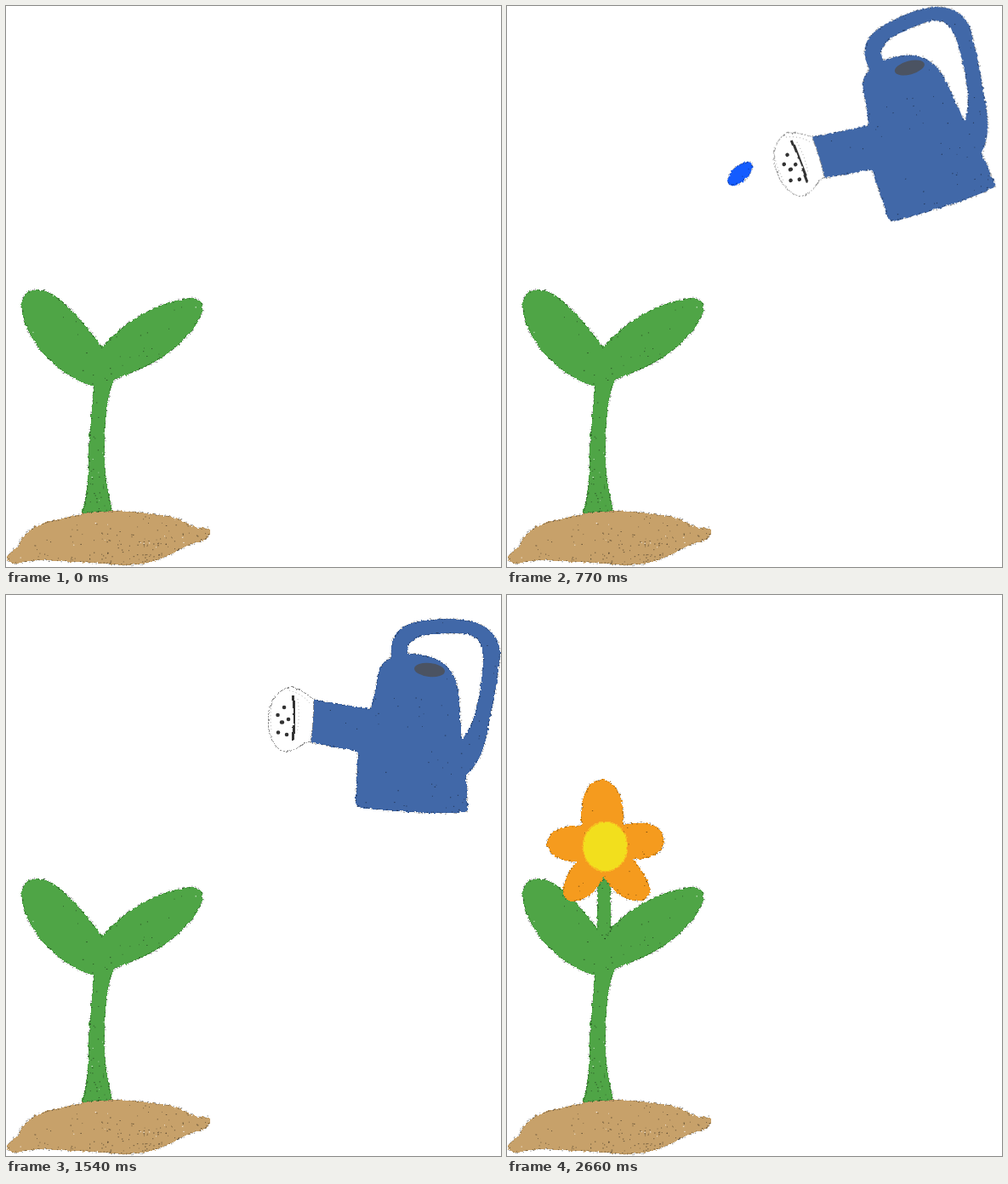
Animation, 582 px wide and 659 px high, one loop 3430 ms. Source, as an HTML page:

```html
<!DOCTYPE html>
<html lang="en">
<head>
<meta charset="utf-8">
<title>Growing a flower</title>
<style>
  html, body { margin: 0; width: 100%; height: 100%; overflow: hidden; background: #fff; }
  svg { display: block; width: 582px; height: 659px; }
  .crayon { filter: url(#rough); shape-rendering: crispEdges; }
  .green { fill: #4fa546; }
  .yellow { fill: #f2df1d; }
  .drop { fill: #145cff; }
</style>
</head>
<body>
<svg viewBox="0 0 582 659">
  <filter id="rough" color-interpolation-filters="sRGB">
    <feTurbulence type="fractalNoise" baseFrequency=".25" numOctaves="2" seed="4"/>
    <feDisplacementMap in="SourceGraphic" scale="3" xChannelSelector="R" yChannelSelector="G"/>
  </filter>

  <g id="plant">
    <path class="crayon green" data-dark="60" data-light="8" d="M88 600Q97 570 97 540T98 505T103 447
      C78 440 56 424 39 403C25 383 18 366 18 350C19 338 28 333 37 333C50 333 61 342 74 354Q97 378 113 401
      C135 373 178 347 216 343C230 343 234 351 230 362C221 384 201 401 180 415Q158 428 127 439
      Q119 457 117 490T116 530Q116 560 127 600Z"/>
    <path class="crayon" fill="#c7a16a" data-dark="130" data-light="14" d="M1 647Q6 640 13 636C20 620 30 612 45 607
      Q70 601 95 595C125 592 150 593 180 598Q200 599 212 607T238 613Q244 619 234 627
      Q212 633 196 643C180 652 160 657 138 657Q120 655 100 654T45 651Q30 651 12 655Q2 654 1 647Z"/>
  </g>

  <path class="crayon green" data-from="1820" data-dark="6" d="M106 394V323H122V394L114 405"/>

  <ellipse class="crayon yellow" data-from="2100" data-to="2660" data-dark="5" cx="116.5" cy="295.5" rx="24.5" ry="29"/>

  <g data-from="2660">
    <path class="crayon" fill="#f59b1e" data-dark="24" d="M88 271C85 243 92 217 111 217C131 217 138 243 137 270
      C160 265 184 267 184 289C184 305 167 311 148 310Q162 326 168 344C169 357 159 361 149 359
      C134 357 121 344 114 331C105 350 90 360 76 360C65 359 64 347 68 337Q73 322 82 313
      C61 314 46 303 47 291C50 275 68 270 88 271Z"/>
    <ellipse class="crayon" fill="#f6bd20" cx="115.5" cy="295.5" rx="27" ry="30"/>
    <ellipse class="crayon yellow" cx="115.5" cy="295.5" rx="25.5" ry="28.5"/>
  </g>

  <g id="can" data-from="350" data-to="1820">
    <path class="crayon" fill="#4168a8" fill-rule="evenodd" data-dark="55" d="M358 122L428 134Q435 115 437 95Q440 79 453 73
      C452 49 458 42 474 34Q492 28 520 28C559 28 582 43 581 72Q576 115 568 150Q562 193 541 212
      L543 254Q530 257 500 256T425 251Q411 250 411 243L414 184L357 173Z
      M472 69C471 55 480 50 494 47Q518 43 543 46C562 52 562 68 560 92Q555 146 536 171
      Q534 148 533 125C532 96 521 69 472 69Z"/>
    <ellipse fill="#4b5362" cx="498" cy="88" rx="18" ry="8" transform="rotate(6 498 88)"/>
    <path class="crayon" fill="#fff" stroke="#888" stroke-width=".9" stroke-dasharray="3 1"
      d="M336 107Q352 114 362 123Q362 150 358 172Q349 174 345 178Q336 184 328 184Q317 181 311 166Q306 151 310 134Q316 112 336 107Z"/>
    <path class="crayon" fill="none" stroke="#333" stroke-width="3" d="M337 117Q342 142 337 170"/>
    <path fill="none" stroke="#aaa" stroke-dasharray="1 3" d="M333 112Q350 117 357 127M343 122Q346 143 342 162M316 118Q309 132 312 158"/>
    <path stroke="#333" stroke-width="4.5" stroke-linecap="round" d="M327 132h.1M319.5 141h.1M324 149.5h1M332 146h.1M320 161.5h.1M330 164h.1"/>
  </g>

  <ellipse class="crayon drop" data-from="770" data-to="1540" data-dark="3" rx="18" ry="9" transform="translate(274 197) rotate(-43)"/>
  <ellipse class="crayon drop" data-from="980" data-to="1540" data-dark="3" rx="18" ry="8.5" transform="translate(233 243) rotate(-62)"/>
  <ellipse class="crayon drop" data-from="1190" data-to="1540" data-dark="3" rx="17" ry="8.5" transform="translate(199 305) rotate(-78)"/>
</svg>

<script>
const LOOP = 3430;
const TILT = "translate(449.5 253) rotate(-21) translate(-411 -248)";
const svg = document.querySelector("svg");
const can = document.getElementById("can");

let seed = 7;
const random = () => (seed = (seed * 16807) % 2147483647) / 2147483647;
const spread = r => (random() * 2 - 1) * r;
const grain = (x, y) => `M${x.toFixed(1)} ${y.toFixed(1)}h${(0.6 + random()).toFixed(1)}`;

function addGrains(shape, d, color) {
  const path = document.createElementNS(svg.namespaceURI, "path");
  path.setAttribute("d", d);
  path.setAttribute("stroke", color);
  for (const name of ["transform", "data-from", "data-to"])
    if (shape.hasAttribute(name)) path.setAttribute(name, shape.getAttribute(name));
  shape.after(path);
}

function edgeGrains(shape) {
  let d = "";
  for (let s = 0; s < shape.getTotalLength(); s += 1.6) {
    const p = shape.getPointAtLength(s);
    if (random() < 0.6) d += grain(p.x - 0.5 + spread(1.2), p.y + spread(1.2));
  }
  return d;
}

// Grains gather towards the lower right, where the crayon is thinner.
function innerGrains(shape, count) {
  const box = shape.getBBox();
  let d = "";
  while (count > 0) {
    const p = svg.createSVGPoint();
    p.x = box.x + Math.sqrt(random()) * box.width;
    p.y = box.y + Math.sqrt(random()) * box.height;
    if (!shape.isPointInFill(p)) continue;
    d += grain(p.x, p.y);
    count--;
  }
  return d;
}

for (const shape of document.querySelectorAll("[data-dark]")) {
  const { dark, light = 0 } = shape.dataset;
  addGrains(shape, edgeGrains(shape) + innerGrains(shape, +dark), "#0007");
  if (light) addGrains(shape, innerGrains(shape, +light), "#fffc");
}

const timed = [...document.querySelectorAll("[data-from]")];
const start = performance.now();

function draw() {
  const t = (performance.now() - start) % LOOP;
  for (const el of timed) {
    const { from, to = LOOP } = el.dataset;
    el.style.visibility = t >= from && t < to ? "visible" : "hidden";
  }
  can.setAttribute("transform", t >= 560 && t < 1540 ? TILT : "");
  requestAnimationFrame(draw);
}
draw();
</script>
</body>
</html>
```
